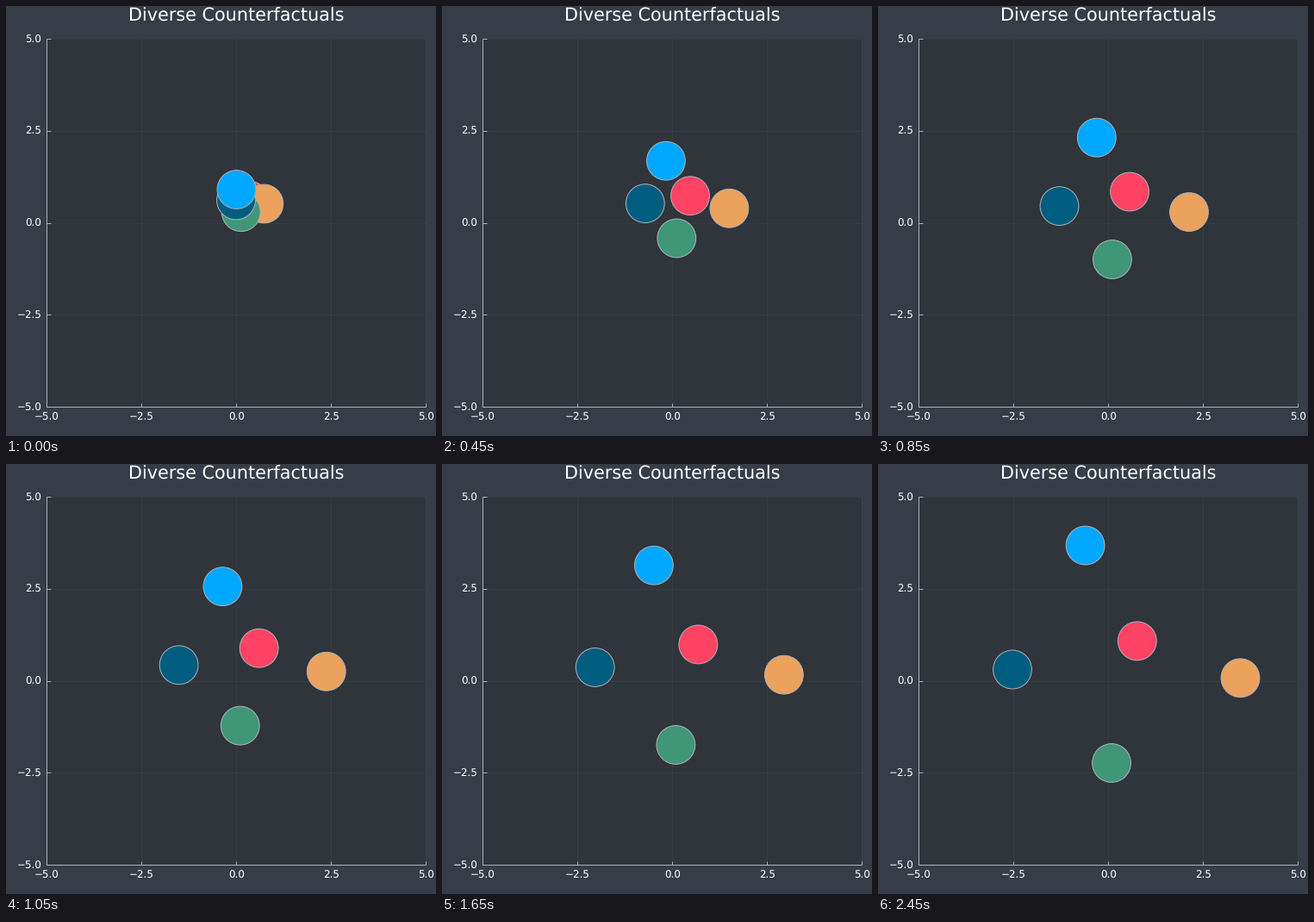
A matplotlib script for the animation above (2500 ms loop, 499 by 499 pixels).

```python
import numpy as np
import matplotlib.pyplot as plt
from matplotlib.animation import FuncAnimation
from matplotlib.patches import Circle, Rectangle

SIZE, DPI = 499, 100
FRAMES, INTERVAL = 50, 50
PX = 72 / DPI  # points per pixel
LEFT, RIGHT, TOP, BOTTOM = 47.2, 487.2, 38.1, 465.1
LINE = "#ADB2B7"
RADIUS = 22.4

# Colour, start and end of each disc, from the lowest layer to the top one
DISCS = [
    ("#FE4365", (283, 226), (300.8, 205.4)),
    ("#ECA25C", (299.3, 229.5), (420.5, 248.3)),
    ("#3F9778", (272.8, 239.2), (271, 347)),
    ("#005D7F", (267, 225.5), (156, 238.5)),
    ("#00A8FF", (267.5, 213), (240.6, 94.5)),
]


def spread(t):
    """Logarithmic drift apart with a soft start."""
    return np.log(0.7 + 0.1 * t + 0.3 * np.exp(-t / 3.5))


plt.rcParams.update({"font.family": "DejaVu Sans", "text.hinting": "none"})
fig = plt.figure(figsize=(SIZE / DPI, SIZE / DPI), dpi=DPI, facecolor="#363D46")
ax = fig.add_axes([0, 0, 1, 1])
ax.set_xlim(0, SIZE)
ax.set_ylim(SIZE, 0)
ax.axis("off")


def line(x, y, alpha=1):
    ax.plot(x, y, color=LINE, lw=PX, alpha=alpha, solid_capstyle="butt")


def label(x, y, text, size, ha="center"):
    ax.text(x, y, text, color="white", fontsize=size * PX, ha=ha, va="baseline")


ax.add_patch(Rectangle((LEFT, TOP), RIGHT - LEFT, BOTTOM - TOP, fc="#30343B", lw=0))

for value in np.linspace(-5, 5, 5):
    x = LEFT + (value + 5) / 10 * (RIGHT - LEFT)
    y = BOTTOM - (value + 5) / 10 * (BOTTOM - TOP)
    line([x, x], [TOP, BOTTOM], 0.06)
    line([LEFT, RIGHT], [y, y], 0.06)
    line([x, x], [BOTTOM, BOTTOM - 4.5])
    line([LEFT, LEFT + 4.5], [y, y])
    text = f"{value:.1f}".replace("-", "\u2212")
    label(x, 480.4, text, 11.9)
    label(41.4, y + 4.4, text, 11.9, "right")

line([LEFT, LEFT], [TOP, BOTTOM])
line([LEFT, RIGHT], [BOTTOM, BOTTOM])
label(266.8, 17.6, "Diverse Counterfactuals", 20.75)

circles = [ax.add_patch(Circle(start, RADIUS, fc=color, ec=LINE, lw=PX, zorder=5))
           for color, start, _ in DISCS]


def update(i):
    s = spread(i) / spread(FRAMES - 1)
    for circle, (_, start, end) in zip(circles, DISCS):
        circle.center = [a + (b - a) * s for a, b in zip(start, end)]
    return circles


anim = FuncAnimation(fig, update, frames=FRAMES, interval=INTERVAL,
                     repeat=True, repeat_delay=0)
plt.show()
```
